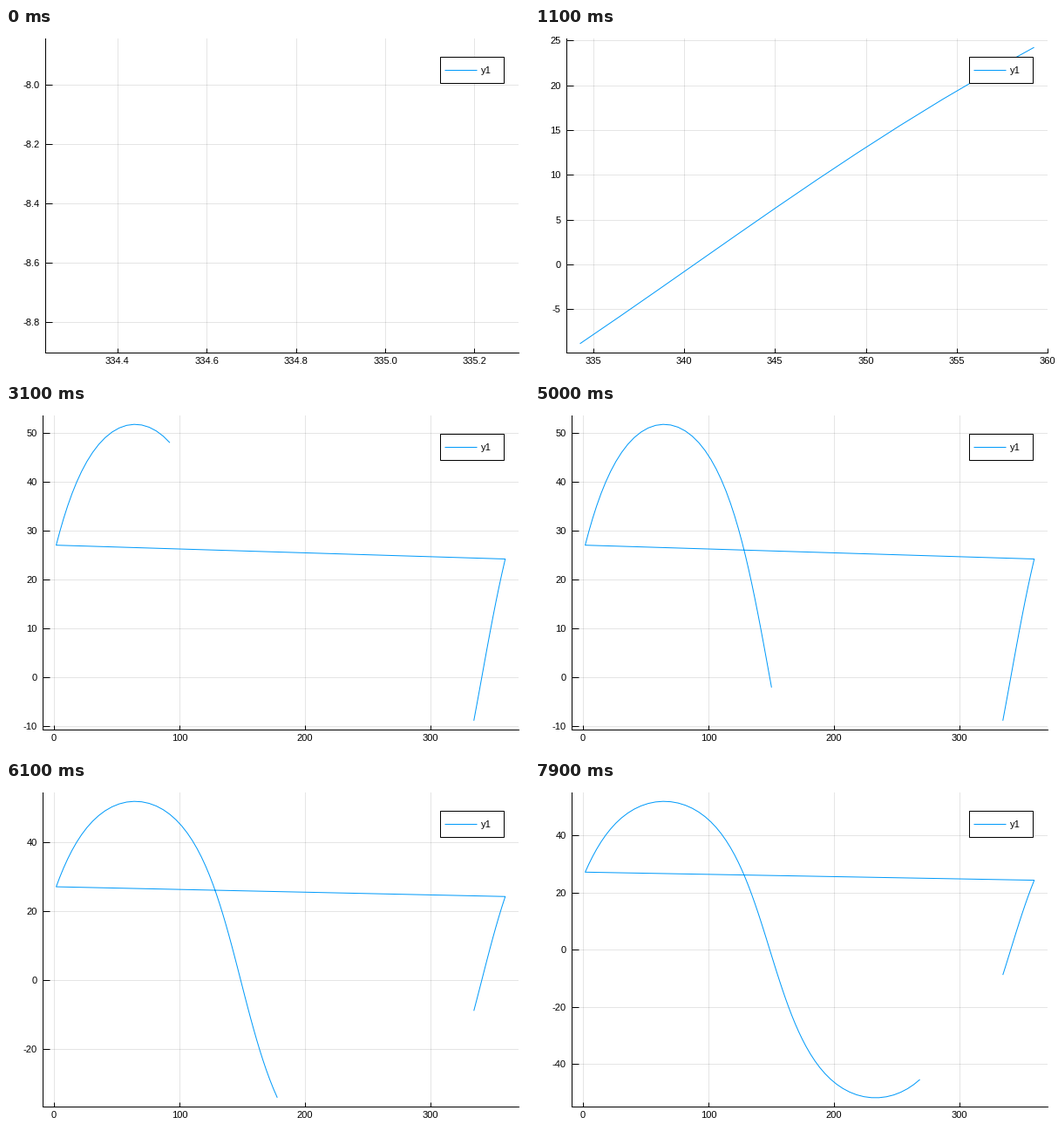
Animation, 600 px wide and 400 px high, one loop 8000 ms. Source, as a matplotlib script:

```python
import math

import matplotlib.pyplot as plt
import numpy as np
from matplotlib.animation import FuncAnimation
from matplotlib.patches import Rectangle

W, H, DPI = 600, 400, 100
FRAMES, INTERVAL = 80, 100
RIGHT, TOP, BOTTOM = 588.2, 12, 372
PX = 72 / DPI
EM = 11.1
BLUE = "#009afa"
STEPS = ((1, 1), (5, .9), (2, .7), (2.5, .5), (3, .2))

plt.rcParams["font.family"] = "Liberation Sans"
plt.rcParams["font.size"] = EM * PX


def ground_track(minutes):
    """Longitude and latitude below a satellite on a circular orbit."""
    tilt = math.radians(51.64)
    start, rate, drift = -11.27, 3.878, .2542

    def node_angle(u):
        return np.degrees(np.unwrap(np.arctan2(math.cos(tilt) * np.sin(u), np.cos(u))))

    u = np.radians(start + rate * minutes)
    lat = np.degrees(np.arcsin(math.sin(tilt) * np.sin(u)))
    lat += .192 * np.sin(2 * np.radians(lat))
    swing = node_angle(u)
    lon = 334.269 + swing - swing[0] - drift * minutes
    return lon % 360, lat


def limits(values):
    lo, hi = values.min(), values.max()
    if hi == lo:
        hi = lo + 1
    pad = .03 * (hi - lo)
    return lo - pad, hi + pad


def nice_ticks(lo, hi, k_min=4, k_max=8, k_ideal=5):
    """Pick the tick set with the best mix of count, coverage and roundness."""
    span = hi - lo
    best, best_score = [], -math.inf
    top = math.ceil(math.log10(span))
    for z in range(top, top - 4, -1):
        for k in range(k_min, 2 * k_max + 1):
            for q, niceness in STEPS:
                step = q * 10.0 ** z
                reach = (k - 1) * step
                r = math.ceil((hi - reach) / step)
                while r * step <= lo:
                    ticks = [(r + i) * step for i in range(k) if lo <= (r + i) * step <= hi]
                    n = len(ticks)
                    if k_min <= n <= k_max:
                        score = (.25 * (1 - abs(n - k_ideal) / k_ideal)
                                 + (r <= 0 and -r < k) / 6
                                 + .5 * span / ((n - 1) * step)
                                 + .25 * niceness)
                        if reach >= 2 * span:
                            score -= 1000
                        if score > best_score:
                            best, best_score = ticks, score
                    r += 1
    return best


def tick_labels(ticks):
    digits = 0
    while any(abs(t - round(t, digits)) > 1e-8 for t in ticks):
        digits += 1
    return [f"{round(t, digits) + 0.0:.{digits}f}" for t in ticks]


def label_width(text):
    return EM * sum({"-": .584, ".": .278}.get(c, .556) for c in text)


lon, lat = ground_track(np.arange(FRAMES))

fig = plt.figure(figsize=(W / DPI, H / DPI), dpi=DPI, facecolor="white")
ax = fig.add_axes([0, 0, 1, 1])
ax.spines[["top", "right"]].set_visible(False)
ax.spines[["left", "bottom"]].set_linewidth(PX)
ax.set_axisbelow(True)
ax.grid(color="black", alpha=.1, linewidth=PX)
ax.tick_params(direction="in", width=PX)
ax.tick_params(axis="x", length=5.4 * PX, pad=13 * PX)
ax.tick_params(axis="y", length=8.1 * PX, pad=6.5 * PX)
track, = ax.plot([], [], color=BLUE, linewidth=PX, solid_capstyle="butt")

# Legend in stage pixels
stage = fig.add_axes([0, 0, 1, 1])
stage.set(xlim=(0, W), ylim=(H, 0))
stage.axis("off")
stage.add_patch(Rectangle((497.5, 32.5), 73, 30, fc="white", ec="black", lw=PX))
stage.plot([503, 539.5], [47.5, 47.5], color=BLUE, linewidth=PX, solid_capstyle="butt")
stage.text(545, 52, "y1")


def draw(frame):
    x, y = lon[:frame + 1], lat[:frame + 1]
    xlim, ylim = limits(x), limits(y)
    xticks, yticks = nice_ticks(*xlim), nice_ticks(*ylim)
    ylabels = tick_labels(yticks)
    left = 23.3 + max(map(label_width, ylabels))
    ax.set_position([left / W, 1 - BOTTOM / H, (RIGHT - left) / W, (BOTTOM - TOP) / H])
    ax.set_xticks(xticks, tick_labels(xticks), va="baseline")
    ax.set_yticks(yticks, ylabels)
    ax.set(xlim=xlim, ylim=ylim)
    track.set_data(x, y)
    return track,


anim = FuncAnimation(fig, draw, frames=FRAMES, interval=INTERVAL,
                     repeat=True, repeat_delay=0, blit=False)
plt.show()
```
